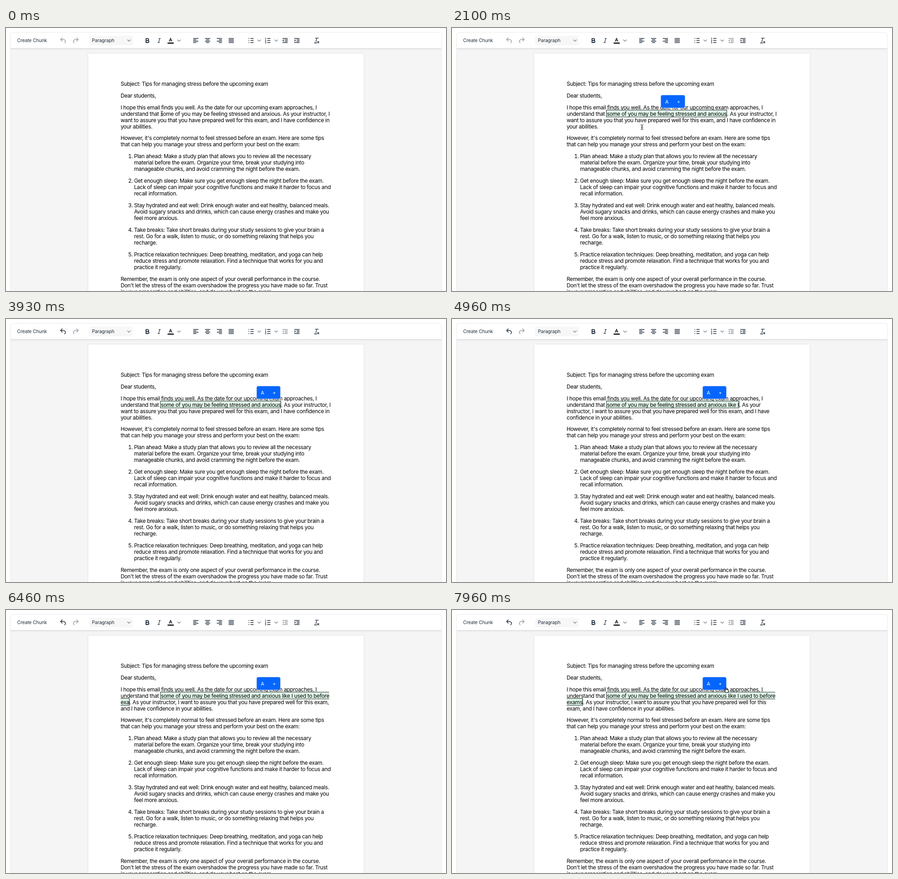
An HTML page for the animation above (8 s loop, 968 px wide and 578 px high).

```html
<!DOCTYPE html>
<html lang="en">
<head>
<meta charset="utf-8">
<title>Editor</title>
<style>
html, body { margin: 0; width: 100%; height: 100%; overflow: hidden; background: #fff; }
#stage { position: relative; width: 968px; height: 578px; overflow: hidden; font-family: Inter, "Liberation Sans", sans-serif; }
#stage > *, .line { position: absolute; }
#frame { left: 9px; top: 9px; width: 948px; height: 620px; border: 1px solid #ebebeb; border-radius: 8px; background: #f5f5f5; overflow: hidden; }
#bar { position: absolute; left: 0; top: 0; width: 100%; height: 34px; background: #fff; box-shadow: 0 2px 4px rgba(34,47,62,.13); }
#page { left: 181px; top: 55.5px; width: 606px; height: 600px; background: #fff; box-shadow: 0 0 3px rgba(0,0,0,.14); }
.line { white-space: pre; height: 14px; line-height: 14px; font-size: 11.88px; letter-spacing: -.298px; color: #000; }
.num { width: 40px; text-align: right; font-variant-numeric: tabular-nums; }
.label { white-space: pre; font-size: 10.4px; line-height: 14px; letter-spacing: -.15px; color: #222f3e; }
#format { left: 183px; top: 17px; width: 96px; height: 21px; background: #f7f7f7; border-radius: 2px; }
.sel { background: #b3d7ff; }
.chunk { display: inline-block; position: relative; z-index: 0; height: 14px; }
.chunk::before { content: ""; position: absolute; z-index: -1; left: 0; right: 0; top: -2px; height: 14px; background: #e2f9eb; border: solid #24332a; border-width: 1px 0; }
.first { padding-left: 1px; }
.last { padding-right: 1px; }
.first::before { border-left-width: 1px; }
.last::before { border-right-width: 1px; }
.caret { position: absolute; right: 0; top: -1px; width: 1px; height: 14px; background: #000; }
#popup { top: 147px; height: 27px; border: 1px solid #8db2ee; border-radius: 4px; background: #0566ff; color: #fff; font-size: 11px; line-height: 28px; display: flex; overflow: hidden; }
#popup span { width: 25.8px; text-align: center; }
svg { left: 0; top: 0; overflow: visible; }
.icon { fill: none; stroke: #222f3e; stroke-width: 2; stroke-linecap: round; stroke-linejoin: round; }
.chev { fill: none; stroke: #6b7480; stroke-width: 1.1; stroke-linecap: round; stroke-linejoin: round; }
</style>
</head>
<body>
<div id="stage">
  <div id="frame"><div id="bar"></div></div>
  <div id="format"></div>
  <div class="label" style="left:24.5px;top:21px">Create Chunk</div>
  <div class="label" style="left:189px;top:21px">Paragraph</div>
  <svg id="tools" width="968" height="50"></svg>
  <div id="page"></div>
  <div id="text"></div>
  <div id="popup"><span id="pa">A</span><span>+</span></div>
  <svg id="mouse" width="20" height="20">
    <g id="beam" fill="none" stroke-linecap="round">
      <path d="M-2.5-5.5Q0-5.5 0-4V4Q0 5.5-2.5 5.5M2.5-5.5Q0-5.5 0-4V4Q0 5.5 2.5 5.5M-1.3.8H1.3" stroke="#fff" stroke-width="2.2"/>
      <path d="M-2.5-5.5Q0-5.5 0-4V4Q0 5.5-2.5 5.5M2.5-5.5Q0-5.5 0-4V4Q0 5.5 2.5 5.5M-1.3.8H1.3" stroke="#333" stroke-width="1"/>
    </g>
    <path id="hand" d="M-2.6 1V-4.3Q-2.6-5.4-1.7-5.4T-.8-4.3V-1.3Q.5-2 1-1Q2.3-1.6 2.7-.5Q4.3-.8 4.3.8V2.5L3.3 5.5H-1.6L-4.6 1.6Q-5-.3-3.6.2Z" fill="#f4f4f4" stroke="#111" stroke-width="1.2" stroke-linejoin="round"/>
  </svg>
</div>
<script>
const $ = id => document.getElementById(id);
const LOOP = 8000;

// Toolbar icons: id, centre x, path on a 24-unit grid, stroke width
const icons = [
  ["undo", 126, "M9 4 4 9l5 5M4.5 9H12c7 0 8 7.5 4 10"],
  ["redo", 153, "M15 4l5 5-5 5M19.5 9H12c-7 0-8 7.5-4 10"],
  ["bold", 311, "M8 6h4.5a3 3 0 0 1 0 6H8zM8 12h5.5a3 3 0 0 1 0 6H8z", 2.5],
  ["italic", 337, "M11 6h5M8 18h5M13.6 6l-3.2 12", 1.6],
  ["color", 362, "M8 14.5 12 5l4 9.5M9.5 11.5h5"],
  ["left", 417.5, "M5 6h14M5 10h8M5 14h14M5 18h8"],
  ["center", 443.5, "M5 6h14M8 10h8M5 14h14M8 18h8"],
  ["right", 469.5, "M5 6h14M11 10h8M5 14h14M11 18h8"],
  ["justify", 495.5, "M5 6h14M5 10h14M5 14h14M5 18h14"],
  ["bullets", 539, "M11 6h8M11 12h8M11 18h8M5.3 6h.8M5.3 12h.8M5.3 18h.8"],
  ["numbers", 576, "M11 6h8M11 12h8M11 18h8"],
  ["outdent", 614, "M5 6h14M12 10h7M12 14h7M5 18h14M7.6 10 5.4 12l2.2 2"],
  ["indent", 640, "M5 6h14M12 10h7M12 14h7M5 18h14M5.4 10l2.2 2-2.2 2"],
  ["clear", 683.5, "M8 5h9M12.2 5.5 9.5 16M5 19h7M14.5 15l4 4M18.5 15l-4 4", 1.8]
];
$("tools").innerHTML = icons.map(([id, x, d, w = 2]) =>
  `<g id="${id}" transform="translate(${x - 8.9} 18.6) scale(.7426)"><path class="icon" style="stroke-width:${w}" d="${d}"/></g>`
).join("") +
  `<path class="icon" style="stroke-width:.9" d="M570.3 22.4l1.2-.6v3M570.2 26.4q1.6-.8 1.5.5l-1.5 2h1.8M570.2 30.6h1.7l-.9 1.1q1.3.1.9 1.3-.6.8-1.7.2"/>` +
  `<path d="M355.5 32h13.5v2.4h-13.5z"/>` +
  [270.5, 380.5, 557, 594.5].map(x => `<path class="chev" d="M${x - 3.2} 26l3.2 3.2 3.2-3.2"/>`).join("");
$("redo").style.opacity = .45;

// Paragraphs; "|" breaks a line, a leading "#" marks a list item
const paragraphs = [
  "Subject: Tips for managing stress before the upcoming exam",
  "Dear students,",
  "I hope this email finds you well. As the date for our upcoming exam approaches, I|||",
  "However, it's completely normal to feel stressed before an exam. Here are some tips|that can help you manage your stress and perform your best on the exam:",
  "#Plan ahead: Make a study plan that allows you to review all the necessary|material before the exam. Organize your time, break your studying into|manageable chunks, and avoid cramming the night before the exam.",
  "#Get enough sleep: Make sure you get enough sleep the night before the exam.|Lack of sleep can impair your cognitive functions and make it harder to focus and|recall information.",
  "#Stay hydrated and eat well: Drink enough water and eat healthy, balanced meals.|Avoid sugary snacks and drinks, which can cause energy crashes and make you|feel more anxious.",
  "#Take breaks: Take short breaks during your study sessions to give your brain a|rest. Go for a walk, listen to music, or do something relaxing that helps you|recharge.",
  "#Practice relaxation techniques: Deep breathing, meditation, and yoga can help|reduce stress and promote relaxation. Find a technique that works for you and|practice it regularly.",
  "Remember, the exam is only one aspect of your overall performance in the course.|Don't let the stress of the exam overshadow the progress you have made so far. Trust|in your preparation and abilities, and do your best on the exam."
];
const live = [];
function addLine(x, y, text, cls = "") {
  const el = document.createElement("div");
  el.className = "line " + cls;
  el.style.left = x + "px";
  el.style.top = Math.round(y) + "px";
  el.textContent = text;
  $("text").append(el);
  return el;
}
let y = 115.75, item = 0;
for (const p of paragraphs) {
  const listed = p[0] === "#";
  if (listed) addLine(239, y, ++item + ".", "num");
  p.replace("#", "").split("|").forEach((s, i) => {
    if (i) y += 14;
    const el = addLine(listed ? 281.7 : 252.2, y, s);
    if (!s) live.push(el);
  });
  y += 25.9;
}

const phrase = "some of you may be feeling stressed and anxious";
const typed = " like I used to before exams";
const keys = [4230, 4360, 4560, 4660, 4760, 4860, 4960, 5030, 5100, 5160, 5230, 5300, 5360,
  5400, 5460, 5530, 5700, 5760, 5830, 5900, 5960, 6030, 6100, 6330, 6400, 6460, 6530, 6730];
const tail = ". As your instructor, I want to assure you that you have prepared well for this exam, and I have confidence in your abilities.".split(" ");
// From this many typed letters, the tail wraps before these words
const wraps = [[0, 5, 22], [1, 4, 21], [3, 3, 20], [14, 2, 19], [20, 1, 19], [24, 17], [27, 16]];
const lastAt = (rows, v) => rows.filter(r => r[0] <= v).pop();

function tailLines(n) {
  const cuts = [0, ...lastAt(wraps, n).slice(1), tail.length];
  return cuts.slice(1).map((c, i) => tail.slice(cuts[i], c).join(" "));
}
const chunk = (s, cls, caret) => `<span class="chunk ${cls}">${s}${caret ? '<i class="caret"></i>' : ""}</span>`;

function paragraphLines(selected, made, n, caret) {
  const lead = "understand that ", rest = tailLines(n);
  if (!made) {
    const mark = selected ? `<span class="sel">${phrase.slice(0, selected)}</span>` : "";
    return [lead + mark + phrase.slice(selected) + rest[0], rest[1], rest[2]];
  }
  const s = phrase + typed.slice(0, n);
  if (n < 24) return [lead + chunk(s, "first last", caret) + rest[0], rest[1], rest[2]];
  const cut = phrase.length + 22;
  return [lead + chunk(s.slice(0, cut), "first"), chunk(s.slice(cut + 1), "last", caret) + rest[0], rest[1]];
}

// Pointer path: time, x, y
const path = [[0, 343, 188], [180, 343, 188], [730, 604, 189], [1160, 604, 189], [1300, 530, 177], [1430, 467, 170],
  [1600, 467, 168], [1780, 425, 205], [1960, 402, 237], [2100, 418, 218], [2450, 520, 200], [2800, 599, 189],
  [3200, 601, 189], [7300, 601, 189], [7600, 609, 186], [7960, 604, 176], [8000, 604, 175]];
const ease = k => k * k * (3 - 2 * k);
function pointer(t) {
  const i = Math.max(1, path.findIndex(p => p[0] > t));
  const [a, b] = [path[i - 1], path[i]];
  const k = ease((t - a[0]) / (b[0] - a[0]));
  return [a[1] + (b[1] - a[1]) * k, a[2] + (b[2] - a[2]) * k];
}

let shown = "";
function draw(t) {
  const [px, py] = pointer(t);
  const made = t >= 1560;
  const n = keys.filter(k => k <= t).length;
  const selected = t < 200 ? 0 : t >= 730 ? phrase.length
    : Math.max(1, Math.min(phrase.length, Math.round((px - 341) / 262 * phrase.length)));
  const caret = t >= 2830 && !(t >= 7060 && t < 7560);
  const key = [selected, made, n, caret].join();
  if (key !== shown) {
    shown = key;
    paragraphLines(selected, made, n, caret).forEach((s, i) => live[i].innerHTML = s);
  }
  $("undo").style.opacity = t >= 3400 ? 1 : .45;
  $("outdent").style.opacity = t >= 200 ? .5 : 1;

  const hand = t >= 1390 && t < 1640 || t >= 7860;
  const pop = $("popup").style;
  pop.visibility = t >= 1160 ? "visible" : "hidden";
  pop.left = (t >= 2830 ? 550.5 : 459) + "px";
  pop.background = hand && t < 1640 ? "#005ce6" : "#0566ff";
  $("pa").style.display = made ? "" : "none";

  $("mouse").style.visibility = t >= 3400 && t < 7300 ? "hidden" : "visible";
  $("mouse").style.transform = `translate(${px}px,${py}px)`;
  $("hand").style.display = hand ? "" : "none";
  $("beam").style.display = hand ? "none" : "";
}

const start = performance.now();
function tick() {
  draw((performance.now() - start) % LOOP);
  requestAnimationFrame(tick);
}
tick();
</script>
</body>
</html>
```
